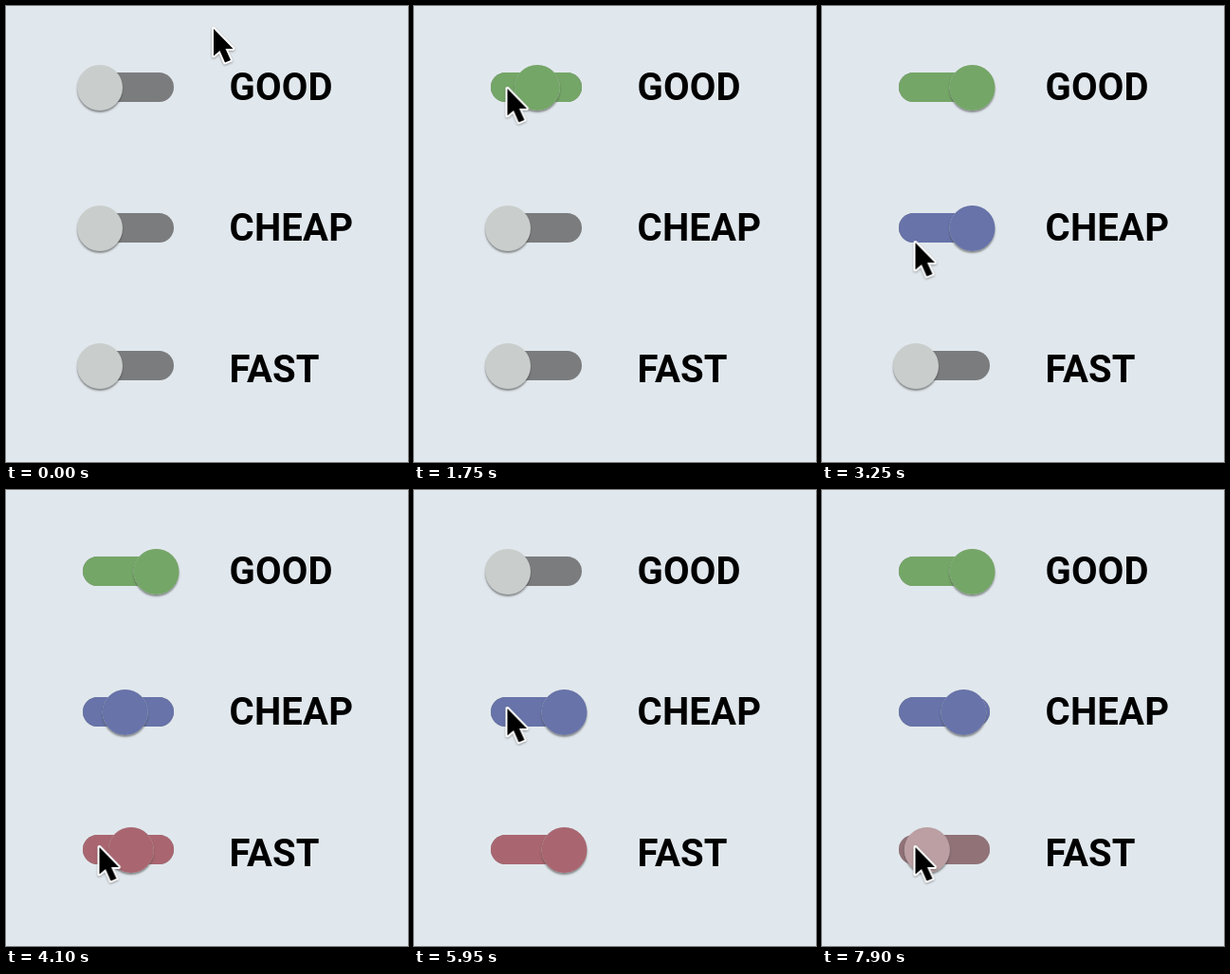
An HTML page for the animation above (8000 ms loop, 424x480 px).

```html
<!DOCTYPE html>
<html lang="en">
<head>
<meta charset="utf-8">
<title>Pick two</title>
<style>
@property --slide { syntax: "<number>"; inherits: true; initial-value: 0; }
@property --tint { syntax: "<number>"; inherits: true; initial-value: 0; }

:root {
  --in-out: cubic-bezier(.455, .03, .515, .955);
  --in: cubic-bezier(.33, 0, .67, .33);
}
html, body {
  margin: 0;
  width: 100%;
  height: 100%;
  overflow: hidden;
  background: #e1e8ed;
}
.row {
  position: absolute;
  left: 0;
  top: var(--y);
}
.track, .knob, .label { position: absolute; }
.track {
  left: 81px;
  top: -16px;
  width: 96px;
  height: 31px;
  border-radius: 16px;
  background: #7b7c7e;
}
.knob {
  left: 75px;
  top: -24px;
  width: 48px;
  height: 48px;
  border-radius: 50%;
  background: #c9cecc;
  box-shadow: 0 2px 2px rgba(60, 60, 60, .55);
  transform: translateX(calc(var(--slide) * 59.5px));
}
.track::after, .knob::after {
  content: "";
  position: absolute;
  inset: 0;
  border-radius: inherit;
  background: var(--color);
  opacity: var(--tint);
}
.label {
  left: 235.5px;
  top: -24px;
  font: 700 40px/48px Roboto, "Open Sans", sans-serif;
  letter-spacing: .2px;
  color: #000;
}

.good  { --y: 86px;    --color: #74a667; animation: good-slide 8s var(--in-out) infinite, good-tint 8s var(--in) infinite; }
.cheap { --y: 233.5px; --color: #6773a9; animation: cheap-slide 8s var(--in-out) infinite, cheap-tint 8s var(--in) infinite; }
.fast  { --y: 378.5px; --color: #a96670; animation: fast-slide 8s var(--in-out) infinite, fast-tint 8s var(--in) infinite; }
.cheap .label { top: -23.5px; }
.fast .label { top: -19.5px; }

/* The last slides are cut off by the loop, so they only accelerate. */
@keyframes good-slide {
  0%, 20% { --slide: 0; }
  23.75%, 70% { --slide: 1; }
  73.75%, 84.375% { --slide: 0; }
  88.125%, 100% { --slide: 1; }
}
@keyframes good-tint {
  0%, 20% { --tint: 0; }
  21.875%, 71.875% { --tint: 1; }
  73.75%, 84.375% { --tint: 0; }
  86.25%, 100% { --tint: 1; }
}
@keyframes cheap-slide {
  0%, 33.125% { --slide: 0; }
  36.875%, 49.31% { --slide: 1; }
  53.06%, 70% { --slide: 0; }
  73.75% { --slide: 1; }
  97.5% { --slide: 1; animation-timing-function: cubic-bezier(.33, 0, .67, .33); }
  100% { --slide: .4; }
}
@keyframes cheap-tint {
  0%, 33.125% { --tint: 0; }
  35%, 51.19% { --tint: 1; }
  53.06%, 70% { --tint: 0; }
  71.875%, 100% { --tint: 1; }
}
@keyframes fast-slide {
  0%, 49.31% { --slide: 0; }
  53.06%, 84.375% { --slide: 1; }
  88.125% { --slide: 0; }
  97.5% { --slide: 0; animation-timing-function: cubic-bezier(.33, 0, .67, .33); }
  100% { --slide: .78; }
}
@keyframes fast-tint {
  0%, 49.31% { --tint: 0; }
  51.19%, 86.25% { --tint: 1; }
  88.125%, 97.5% { --tint: 0; }
  99.375%, 100% { --tint: 1; }
}

.cursor {
  position: absolute;
  left: 0;
  top: 0;
  overflow: visible;
  filter: drop-shadow(0 1px 1px rgba(0, 0, 0, .35));
  animation: point 8s var(--in-out) infinite;
}
@keyframes point {
  0%, 5.75% { transform: translate(219px, 24px); }
  14.75% { transform: translate(98.5px, 81px); }
  22.5% { transform: translate(98.5px, 87px); }
  30%, 38.75% { transform: translate(98.5px, 230px); }
  46.25%, 61.25% { transform: translate(98.5px, 376px); }
  68.75%, 74.375% { transform: translate(98.5px, 230px); }
  81.875%, 88.75% { transform: translate(98.5px, 88px); }
  96.25%, 100% { transform: translate(98.5px, 376px); }
}
</style>
</head>
<body>
<div class="row good"><div class="track"></div><div class="knob"></div><div class="label">GOOD</div></div>
<div class="row cheap"><div class="track"></div><div class="knob"></div><div class="label">CHEAP</div></div>
<div class="row fast"><div class="track"></div><div class="knob"></div><div class="label">FAST</div></div>
<svg class="cursor" width="24" height="40">
  <path d="M0 0V28.5L6.5 23L12 35.5L18 33L12.5 21H20.5Z"
        stroke="#fff" stroke-width="4" stroke-linejoin="round" paint-order="stroke"/>
</svg>
</body>
</html>
```
